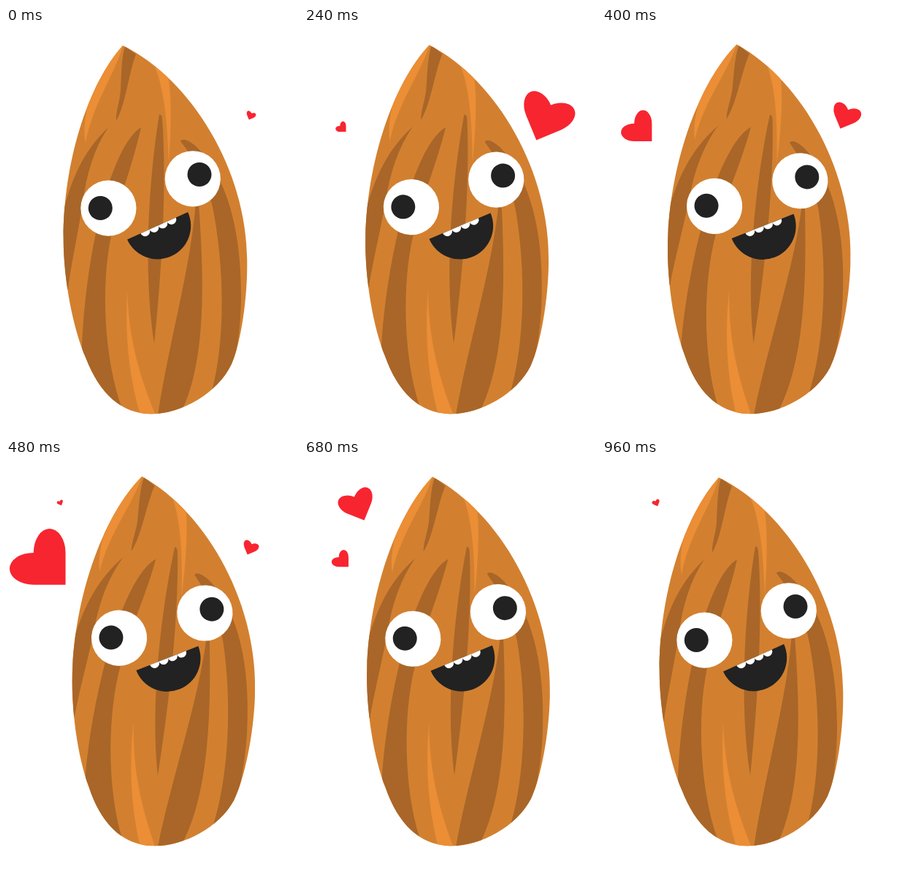
Recreate the animation shown at these times as an HTML page with a canvas. Size 400 by 553 pixels, loop 1000 ms.

```html
<!DOCTYPE html>
<html lang="en">
<head>
<meta charset="utf-8">
<title>Almond in love</title>
<style>
  html, body { margin: 0; width: 100%; height: 100%; overflow: hidden; background: #fff; }
  canvas { display: block; width: 400px; height: 553px; }
</style>
</head>
<body>
<canvas id="stage"></canvas>
<script>
const W = 400, H = 553, LOOP = 1000, STEP = 40, SWAY = 960;
const SKIN = '#d28030', DARK = '#a96628', LIGHT = '#eb8e35';
const INK = '#222222', WHITE = '#ffffff', RED = '#f72530';
const TAU = Math.PI * 2;

const canvas = document.getElementById('stage');
const ctx = canvas.getContext('2d');
const dpr = window.devicePixelRatio || 1;
canvas.width = W * dpr;
canvas.height = H * dpr;

const body = new Path2D(`M160 24 C111.5 78 78.7 185 78.7 288 C78.7 345 92 412 109.5 452
  C128 500 158 528.3 199 528.3 C240 528.3 290 500 309 460
  C322 430 331 370 330.3 318 C330 195 254 70 160 24Z`);

const darkGrain = [
  'M163 25 L178 36 C168 62 164 105 151 127 C150 115 156 100 157 85 C158 65 158 40 163 25Z',
  'M140 136 C121 165 110 200 105 240 C98 285 88 330 85 358 L70 340 L76 262 C90 200 110 165 140 136Z',
  'M185 136 C162 150 143 200 130 250 C115 310 106 380 104 437 L110 520 L158 518 C134 450 130 350 144 285 C150 245 172 195 185 136Z',
  'M210 118 C198 190 186 325 203 432 C212 345 221 220 214 124 Q213 118 210 118Z',
  'M239 155 C242 148 258 158 266 168 C300 205 322 270 322 365 C322 400 318 430 316 440 L310 470 L282 497 C300 430 300 330 283 245 C275 210 262 185 239 155Z',
  'M260 238 C253 330 223 430 208 530 L238 530 C274 460 272 350 264 240Z'
].map(d => new Path2D(d));

const lightGrain = [
  'M160 24 C150 62 118 105 109 157 C106 140 108 120 114 98 L120 65 L150 24Z',
  'M204 53 C217 85 221 130 223 185 C226 140 227 100 223 71 L215 45Z',
  'M166 360 C163 420 168 475 184 530 L205 530 C180 470 168 420 166 360Z'
].map(d => new Path2D(d));

const hearts = [
  { x: 336, y: 119.3, turn: 22.5, size: 1, peak: 282, pow: 1.75, from: 0, to: 560 },
  { x: 52, y: 135.5, turn: -45, size: 1.055, peak: 500, pow: 1.7, from: 220, to: 780 },
  { x: 74.5, y: 58, turn: -23, size: 0.705, peak: 735, pow: 2.1, from: 460, to: 1000 }
];

function disc(x, y, r, color) {
  ctx.fillStyle = color;
  ctx.beginPath();
  ctx.arc(x, y, r, 0, TAU);
  ctx.fill();
}

function halfDisc(x, r, color) {
  ctx.fillStyle = color;
  ctx.beginPath();
  ctx.arc(x, 0, r, 0, Math.PI);
  ctx.fill();
}

function fillAll(paths, color) {
  ctx.fillStyle = color;
  paths.forEach(p => ctx.fill(p));
}

function drawMouth() {
  ctx.save();
  ctx.translate(207.6, 270.8);
  ctx.rotate(-24.3 * Math.PI / 180);
  halfDisc(0, 45.6, INK);
  for (let i = 0; i < 4; i++) halfDisc(-18.7 + i * 13.2, 6.7, WHITE);
  ctx.restore();
}

// 0 = leaning left, 1 = leaning right
function lean(t) {
  const p = Math.pow(1 - Math.abs(1 - 2 * Math.min(t / SWAY, 1)), 1.08);
  return p < 0.5 ? 2 * p * p : 1 - 2 * (1 - p) * (1 - p);
}

function drawAlmond(t) {
  ctx.save();
  ctx.translate(203, 525);
  ctx.rotate(0.0523 * lean(t));
  ctx.translate(-203, -525);

  fillAll([body], SKIN);
  ctx.save();
  ctx.clip(body);
  fillAll(lightGrain, LIGHT);
  fillAll(darkGrain, DARK);
  ctx.restore();

  disc(140.4, 246.6, 38.1, WHITE);
  disc(129.3, 246.5, 16.5, INK);
  disc(255.8, 206.3, 38.1, WHITE);
  disc(265, 200.5, 16.5, INK);
  drawMouth();
  ctx.restore();
}

function drawHeart(h, t) {
  if (t < h.from || t >= h.to) return;
  const k = h.size / (1 + Math.pow(Math.abs(t - h.peak) / 105, h.pow));
  ctx.save();
  ctx.translate(h.x, h.y);
  ctx.rotate(h.turn * Math.PI / 180);
  ctx.scale(k, k);
  ctx.translate(-4, 46);
  // a square standing on its corner, with a half ellipse on each upper side
  ctx.rotate(Math.PI / 4);
  ctx.fillStyle = RED;
  ctx.beginPath();
  ctx.moveTo(0, 0);
  ctx.lineTo(0, -44);
  ctx.ellipse(-22, -44, 22, 33, 0, 0, -Math.PI, true);
  ctx.ellipse(-44, -22, 33, 22, 0, -Math.PI / 2, Math.PI / 2, true);
  ctx.closePath();
  ctx.fill();
  ctx.restore();
}

function draw(now) {
  const t = Math.floor((now % LOOP) / STEP) * STEP;
  ctx.setTransform(dpr, 0, 0, dpr, 0, 0);
  ctx.fillStyle = WHITE;
  ctx.fillRect(0, 0, W, H);
  drawAlmond(t);
  hearts.forEach(h => drawHeart(h, t));
}

const start = performance.now();
function tick() {
  draw(performance.now() - start);
  requestAnimationFrame(tick);
}
tick();
</script>
</body>
</html>
```
